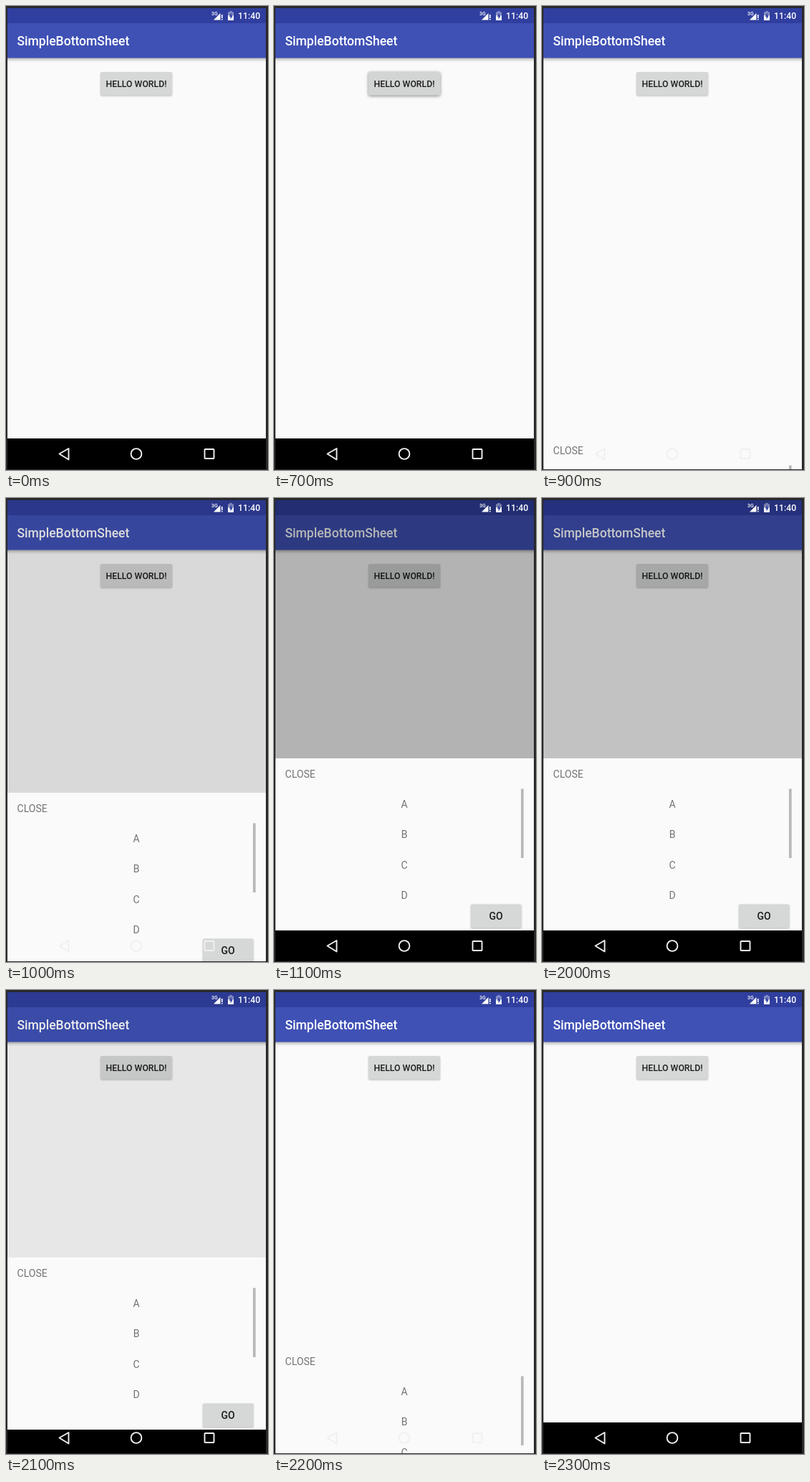
Write an HTML page that moves like this. It is 366x647 px and loops after 3600 ms.

```html
<!DOCTYPE html>
<html lang="en">
<head>
<meta charset="utf-8">
<title>Bottom sheet</title>
<style>
  html, body { margin: 0; width: 100%; height: 100%; overflow: hidden; background: #29292b; }
  svg { display: block; width: 366px; height: 647px; font-family: Roboto, sans-serif; }
  .medium { font-weight: 500; }
  .middle { text-anchor: middle; }
  .bar { filter: drop-shadow(0 2px 2px rgba(0, 0, 0, .32)); }
  .button { fill: #d6d7d7; filter: drop-shadow(0 1px 1px rgba(0, 0, 0, .26)); }
  .button.pressed { fill: #d3d4d4; filter: drop-shadow(0 1px 2px rgba(0, 0, 0, .48)); }
</style>
</head>
<body>
<svg viewBox="0 0 366 647">
  <clipPath id="screen"><rect x="2" y="3" width="361" height="643"/></clipPath>
  <g clip-path="url(#screen)">
    <rect x="2" y="3" width="361" height="643" fill="#fafafa"/>
    <rect class="bar" x="-8" y="24" width="381" height="48.5" fill="#3f51b5"/>
    <rect x="2" y="3" width="361" height="21" fill="#303f9f"/>
    <text class="medium" x="15.5" y="55" font-size="17.55" fill="#fff">SimpleBottomSheet</text>
    <rect id="hello" class="button" x="132" y="92" width="100" height="32.5" rx="1.8"/>
    <text class="medium middle" x="182" y="113" font-size="12.28" fill="#1c1c1c">HELLO WORLD!</text>

    <rect x="2" y="603" width="361" height="44"/>
    <rect id="dim" x="2" y="3" width="361" height="600"/>

    <!-- status icons stay bright above the dimming -->
    <g fill="#fff">
      <text class="medium" x="287" y="12.5" font-size="7">3G</text>
      <path d="M290 19.5L299.5 10V19.5Z"/>
      <path d="M301 12h1.6v5h-1.6zM301 18h1.6v1.6h-1.6z"/>
      <path d="M310 8.5h2.2V7h3.6v1.5h2.2V14h-8z" opacity=".4"/>
      <path d="M310 13h8v7h-8z"/>
      <path d="M315 9.5L311.5 14.8H313.6V18.5L317 13.2H315Z" fill="#303f9f"/>
      <text class="medium" x="324" y="18" font-size="12.28">11:40</text>
    </g>

    <g id="sheet">
      <rect x="2" y="363" width="361" height="240" fill="#fafafa"/>
      <g font-size="14.04" fill="#737373">
        <text x="15.5" y="390">CLOSE</text>
        <g class="middle">
          <text x="182" y="432.3">A</text>
          <text x="182" y="474.4">B</text>
          <text x="182" y="516.5">C</text>
          <text x="182" y="558.6">D</text>
        </g>
      </g>
      <rect x="345" y="405.5" width="3.7" height="96.5" fill="#b8b8b8"/>
      <rect class="button" x="275" y="566.5" width="70.5" height="33" rx="1.8"/>
      <text class="medium middle" x="310" y="588" font-size="14.04" fill="#1c1c1c">GO</text>
    </g>

    <g fill="none" stroke="#f0f0f0" stroke-width="1.9" stroke-linejoin="round">
      <path d="M74.5 624.5L87.5 617V632.5Z"/>
      <circle cx="182" cy="624.5" r="7.4"/>
      <rect x="277.5" y="618" width="13" height="13" rx=".8"/>
    </g>
  </g>
</svg>
<script>
  const LOOP = 3600, STEP = 100, TRAVEL = 284, FADE = 200;
  const [hello, dim, sheet] = ['hello', 'dim', 'sheet'].map(id => document.getElementById(id));
  const progress = (t, start) => Math.min(1, Math.max(0, (t - start) / FADE));

  function draw(now) {
    // the screen refreshes ten times a second
    const t = Math.floor((now % LOOP) / STEP) * STEP;
    const opening = (1 - progress(t, 882)) ** 2;
    const closing = progress(t, 2063) ** 2;
    const offset = TRAVEL * Math.max(opening, closing);

    hello.classList.toggle('pressed', t >= 700 && t < 900);
    dim.setAttribute('opacity', 0.3 * (progress(t, 910) - progress(t, 1950)));
    sheet.setAttribute('transform', `translate(0 ${Math.round(offset)})`);
    sheet.setAttribute('visibility', offset < TRAVEL ? 'visible' : 'hidden');
    requestAnimationFrame(() => draw(performance.now()));
  }
  draw(performance.now());
</script>
</body>
</html>
```
